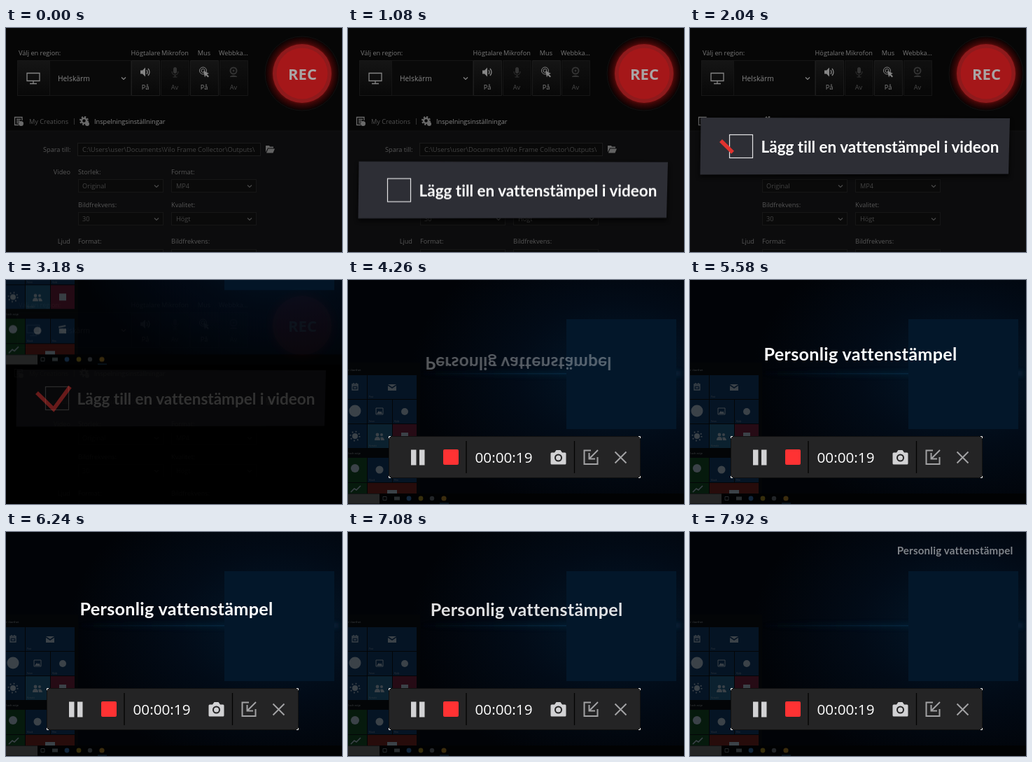
Recreate the animation shown at these times as an HTML page. Size 480 by 320 pixels, loop 8000 ms.

```html
<!DOCTYPE html>
<html lang="sv">
<head>
<meta charset="utf-8">
<title>Personlig vattenstämpel</title>
<style>
html, body { margin: 0; width: 100%; height: 100%; overflow: hidden; background: #000; }
svg { display: block; width: 100vw; height: 100vh; }
text { font-family: "Open Sans", "Noto Sans", sans-serif; font-size: 9.2px; }
.lato { font-family: Lato, "Open Sans", sans-serif; font-weight: 700; font-variant-ligatures: none; fill: #fff; text-anchor: middle; }
.mid { text-anchor: middle; }
.end { text-anchor: end; }
.line { fill: none; stroke: currentColor; }
.anim { animation: 8s linear infinite; }

#recorder { animation-name: fade; animation-timing-function: cubic-bezier(.2, .8, .4, 1); }
#plate { animation-name: fade; animation-timing-function: cubic-bezier(.25, .53, .6, 1); }
#banner { animation-name: rise; }
#check { animation-name: tick, fade; stroke-dasharray: 1 1.2; }
#desktop { animation-name: drop; }
#toolbar { animation-name: lift; }
#mark { animation-name: mark; }

@keyframes fade {
  0%, 36% { opacity: 1; }
  42.75%, 100% { opacity: 0; }
}
@keyframes rise {
  0%, 9.75% { transform: translateY(200px); animation-timing-function: cubic-bezier(.33, .31, .67, 1); }
  16.5%, 100% { transform: none; }
}
@keyframes tick {
  0%, 24.75% { stroke-dashoffset: 1.02; }
  27%, 100% { stroke-dashoffset: 0; }
}
@keyframes drop {
  0%, 36% { transform: translateY(-320px); animation-timing-function: ease-in; }
  42.75%, 100% { transform: none; }
}
@keyframes lift {
  0%, 36% { transform: translateY(320px); animation-timing-function: ease-in; }
  42.75%, 100% { transform: none; }
}
@keyframes mark {
  0%, 52.5% { opacity: 0; transform: translate(243.5px, 119px) scale(.964, -1); }
  53.25% { opacity: .34; transform: translate(243.5px, 119px) scale(.964, -1); animation-timing-function: ease-in-out; }
  63.75% { opacity: 1; transform: translate(243.5px, 125px) scale(1, 1); animation-timing-function: ease-in-out; }
  69.75% { transform: translate(243.5px, 106px) scale(1, 1); }
  73.5% { transform: translate(243.5px, 103px) scale(1, 1); animation-timing-function: ease-in-out; }
  83.25%, 87.75% { opacity: 1; transform: translate(243.5px, 119px) scale(1, 1); }
  88.5% { opacity: .88; transform: translate(255px, 111px) scale(.995, .995); }
  98.75%, 100% { opacity: .5; transform: translate(378.5px, 27px) scale(.6, .6); }
}
</style>
</head>
<body>
<svg viewBox="0 0 480 320" preserveAspectRatio="none">
  <defs>
    <radialGradient id="sky" gradientUnits="userSpaceOnUse" cx="390" cy="135" r="300" gradientTransform="translate(0 40) scale(1 .7)">
      <stop offset="0" stop-color="#03182b"/>
      <stop offset=".5" stop-color="#020b17"/>
      <stop offset="1" stop-color="#010307"/>
    </radialGradient>
    <linearGradient id="beam">
      <stop offset="0" stop-color="#0b3350" stop-opacity="0"/>
      <stop offset="1" stop-color="#0b3350"/>
    </linearGradient>
    <radialGradient id="glow">
      <stop offset=".7" stop-color="#8a1212"/>
      <stop offset=".84" stop-color="#3a0606"/>
      <stop offset="1" stop-color="#080202"/>
    </radialGradient>
    <linearGradient id="tile" x2="0" y2="1">
      <stop offset="0" stop-color="#151515"/>
      <stop offset="1" stop-color="#080808"/>
    </linearGradient>
    <filter id="soft" x="-10%" y="-200%" width="120%" height="500%"><feGaussianBlur stdDeviation="3"/></filter>
    <path id="chevron" class="line" d="M-3-1.5 0 1.5 3-1.5" stroke-width="1.2"/>
    <g id="combo">
      <rect x=".5" y=".5" width="121" height="18" fill="#0a0a0a" stroke="#161616"/>
      <use href="#chevron" x="112" y="10"/>
    </g>
  </defs>

  <rect width="480" height="320"/>

  <g id="desktop" class="anim">
    <rect width="480" height="320" fill="url(#sky)"/>
    <rect x="100" y="130" width="375" height="7" fill="url(#beam)" opacity=".55" filter="url(#soft)"/>
    <rect x="100" y="133" width="212" height="1.5" fill="url(#beam)" opacity=".5"/>
    <rect x="312" y="56" width="157" height="157" fill="#03172a"/>

    <rect y="118" width="103" height="188" fill="#030507"/>
    <g opacity=".55">
      <g fill="#6c7073">
        <text x="0" y="130" style="font-size:4px">r i korthet</text>
        <text x="0" y="249" style="font-size:4px">l och nöje</text>
      </g>
      <g fill="#08213d">
        <path d="M0 136h27v34H0zM28 136h70v34H28zM0 171h27v34H0zM28 171h35v34H28zM64 171h34v34H64zM0 206h27v34H0z"/>
        <path d="M28 254h35v35H28zM64 254h34v35H64z"/>
      </g>
      <path d="M28 206h35v34H28z" fill="#123950"/>
      <path d="M64 206h34v34H64z" fill="#431021"/>
      <path d="M0 254h27v35H0zM0 290h27v15H0z" fill="#0a2c12"/>
      <path d="M28 290h70v15H28z" fill="#46120f"/>

      <g color="#69747e" fill="#69747e">
        <path class="line" d="M6 149h8v8H6zM6 151h8M8 147v2M12 147v2M8 154h4" stroke-width="1.3"/>
        <path d="M57 149h12l-6 4zM57 151l6 4 6-4v7H57z"/>
        <circle cx="10" cy="187" r="8.5"/>
        <path class="line" d="M40 183h10v9H40z"/>
        <path d="M41 191l3-4 2 2 1-2 2 4z"/>
        <circle cx="81" cy="188" r="5"/>
        <circle cx="10" cy="223" r="4"/>
        <circle class="line" cx="10" cy="223" r="6.5" stroke-width="2" stroke-dasharray="1.6 3.5"/>
        <circle cx="42" cy="221" r="2.4"/><circle cx="48" cy="221" r="2"/>
        <path d="M38 229q0-5 4-5t4 5zM47 229q0-3-1-4 5-2 6 4z"/>
        <rect x="76" y="218" width="10" height="10"/>
        <circle cx="10" cy="269" r="6"/>
        <circle cx="45" cy="271" r="5.5"/>
        <path d="M76 268h10v7H76zM75 265l10-2 .5 2-10 2z"/>
        <path class="line" d="M4 303l5-5 3 2 6-6" stroke-width="1.6"/>
        <path d="M56 300h14v5H56z"/>
      </g>
      <g fill="#59636d">
        <text x="30" y="168" style="font-size:3px">Post</text>
        <text x="30" y="203" style="font-size:3px">Foton</text>
        <text x="66" y="203" style="font-size:3px">Hjälp</text>
        <text x="30" y="238" style="font-size:3px">Kontakt</text>
        <text x="30" y="287" style="font-size:3px">Musik</text>
        <text x="66" y="287" style="font-size:3px">Film</text>
      </g>
    </g>

    <rect y="305" width="480" height="15" fill="#010203"/>
    <rect y="305.5" width="45" height="14" fill="#252626"/>
    <g opacity=".5">
      <path class="line" d="M50 309.5h5v5h-5z" color="#4a5054"/>
      <rect x="66" y="309.5" width="8" height="5" fill="#4d5659"/>
      <circle cx="87" cy="312" r="3.4" fill="#234a73"/>
      <circle cx="104" cy="312" r="3.4" fill="#6b5a16"/>
      <circle cx="120" cy="312" r="3.2" fill="#44494d"/>
      <circle cx="137" cy="312" r="3.6" fill="#75561a"/>
      <path d="M131 318.5h13v1h-13z" fill="#234f70"/>
    </g>
  </g>

  <g id="toolbar" class="anim">
    <rect x="58.5" y="223.5" width="359" height="59" fill="#242425" stroke="#111"/>
    <path class="line" d="M58.5 226v-2.5h2.500M415 223.5h2.500v2.500M417.5 280v2.500H415M61 282.5h-2.500V280" color="#eee"/>
    <path d="M90 242.500h7.500v22H90zM102 242.500h7.500v22H102z" fill="#d2d2d4"/>
    <rect x="136" y="242" width="22" height="22" rx="2" fill="#ff3233"/>
    <path class="line" d="M169 230v46M323.500 230v46" color="#030303" stroke-width="1.3"/>
    <text class="mid" x="222.500" y="260.700" fill="#fff" style="font-size:20.7px">00:00:19</text>
    <path d="M291 246.500h4l2.500-3.500h6l2.500 3.500h4q1.500 0 1.500 1.500v14q0 1.500-1.500 1.500h-19q-1.500 0-1.500-1.500v-14q0-1.500 1.500-1.500z" fill="#d2d2d4"/>
    <circle cx="300.500" cy="254" r="4.500" fill="#d2d2d4" stroke="#242425" stroke-width="2"/>
    <path class="line" d="M347 243.500h-9.500v19.500h19V253M357 243l-12 12M344.500 247v8.500h8.500" color="#a2a2a4" stroke-width="2"/>
    <path class="line" d="M381.500 245.500l16 16M397.500 245.500l-16 16" color="#a2a2a4" stroke-width="2"/>
  </g>

  <g id="mark" class="anim">
    <text class="lato" y="9" style="font-size:25.2px;letter-spacing:.3px">Personlig vattenstämpel</text>
  </g>

  <g id="recorder" class="anim">
    <rect width="480" height="320" fill="#060606"/>
    <rect y="147" width="480" height="173" fill="#0c0c0d"/>
    <path d="M0 147h480" stroke="#131313"/>

    <g fill="#787878">
      <text x="18" y="39">Välj en region:</text>
      <g class="mid">
        <text x="199.500" y="39">Högtalare</text>
        <text x="241.500" y="39">Mikrofon</text>
        <text x="283" y="39">Mus</text>
        <text x="325" y="39">Webbka...</text>
      </g>
    </g>

    <rect x="16.500" y="46.500" width="46" height="50" fill="url(#tile)" stroke="#171717"/>
    <rect x="62.500" y="46.500" width="116" height="50" fill="#090909" stroke="#151515"/>
    <g fill="url(#tile)" stroke="#1c1c1c">
      <path d="M179.500 46.500h40v50h-40zM263.500 46.500h40v50h-40z"/>
      <path d="M221.500 46.500h40v50h-40zM305.500 46.500h40v50h-40z" opacity=".7"/>
    </g>
    <g color="#858585" fill="#858585">
      <path class="line" d="M30 64.500h18v11H30zM39 76v3M34 79.500h10" stroke-width="1.3"/>
      <text x="74" y="75.500" style="font-size:10.3px">Helskärm</text>
      <use href="#chevron" x="168" y="72"/>
      <path d="M192 60.500h3l4-4v13l-4-4h-3z"/>
      <path class="line" d="M201 60q2 3 0 6M203 58q4 5 0 10" stroke-width="1.3"/>
      <circle class="line" cx="281.500" cy="61" r="5"/>
      <circle class="line" cx="281.500" cy="61" r="2.500"/>
      <path d="M282 61l8 4-3 1 3 3-1.500 1.500-3-3-1.500 3z"/>
      <text class="mid" x="199" y="88">På</text>
      <text class="mid" x="283" y="88">På</text>
    </g>
    <g color="#333" fill="#333">
      <rect x="239" y="56" width="5" height="9" rx="2.500"/>
      <path class="line" d="M237 62q0 5 4.500 5t4.500-5M241.500 67v3M238.500 70h6"/>
      <circle class="line" cx="325" cy="61" r="4.500" stroke-width="2"/>
      <circle cx="325" cy="61" r="1.500"/>
      <path d="M320 69q5-3 10 0v1h-10z"/>
      <text class="mid" x="241" y="88" fill="#484848">Av</text>
      <text class="mid" x="325" y="88" fill="#484848">Av</text>
    </g>

    <circle cx="423" cy="65" r="53" fill="url(#glow)" stroke="#111"/>
    <circle cx="423" cy="65" r="42" fill="#8e1a1c"/>
    <circle cx="423" cy="65" r="36.500" fill="#a51719"/>
    <text class="mid" x="423.500" y="74" fill="#aaa4a4" style="font-size:22px;font-weight:700">REC</text>

    <g color="#6a6a6a" fill="#6a6a6a">
      <path class="line" d="M23 132v-4.500H12.500v11H18M15 130.500h6M15 133h5M15 135.500h3" stroke-width="1.3"/>
      <circle cx="21.500" cy="136.500" r="3.500"/>
      <text x="33" y="136.500" fill="#505050">My Creations</text>
      <path d="M97 129v9h1v-9z" fill="#333"/>
      <circle class="line" cx="111.500" cy="132.500" r="3.500" stroke-width="2.500"/>
      <circle class="line" cx="111.500" cy="132.500" r="5.500" stroke-width="2" stroke-dasharray="2.300 2"/>
      <circle cx="116" cy="137" r="3"/>
      <text x="126" y="136.500" fill="#858585">Inspelningsinställningar</text>
    </g>

    <rect x="102.500" y="164.500" width="261" height="18" fill="#090909" stroke="#1a1a1a"/>
    <path d="M371 168h5l1 1.500h5v2h-8l-3 6zM374.500 172.500H384l-2.500 6H372z" fill="#626262"/>
    <g color="#4a4a4a">
      <use href="#combo" x="103" y="216"/>
      <use href="#combo" x="236" y="216"/>
      <use href="#combo" x="103" y="263"/>
      <use href="#combo" x="236" y="263"/>
      <use href="#combo" x="103" y="316"/>
      <use href="#combo" x="236" y="316"/>
    </g>
    <g fill="#565656">
      <g class="end">
        <text x="92.500" y="176.500">Spara till:</text>
        <text x="92" y="209">Video</text>
        <text x="92" y="308">Ljud</text>
      </g>
      <text x="103" y="209">Storlek:</text>
      <text x="236" y="209">Format:</text>
      <text x="103" y="256">Bildfrekvens:</text>
      <text x="236" y="256">Kvalitet:</text>
      <text x="103" y="308">Format:</text>
      <text x="236" y="308">Bildfrekvens:</text>
    </g>
    <g fill="#434343">
      <text x="109" y="176.500" style="font-size:9.4px">C:\Users\user\Documents\Vilo Frame Collector\Outputs\</text>
      <text x="109" y="229">Original</text>
      <text x="243" y="229">MP4</text>
      <text x="109" y="276">30</text>
      <text x="243" y="276">Högt</text>
    </g>
  </g>

  <g id="banner" class="anim">
    <g id="plate" class="anim">
      <path d="M15 131L457 132 456 213H14z" opacity=".7" filter="url(#soft)"/>
      <path d="M15.500 128L457 129 455 208.500 14.500 209.500z" fill="#2d2e35"/>
      <rect x="56.500" y="152.500" width="33" height="33" fill="none" stroke="#e4e4e6" stroke-width="1.200"/>
      <text class="lato" x="271.500" y="178" style="font-size:22.5px">Lägg till en vattenstämpel i videon</text>
    </g>
    <path id="check" class="anim line" pathLength="1" d="M44 161L68 184.500 91.500 152.500" color="#e0332f" stroke-width="5.500"/>
  </g>
</svg>
</body>
</html>
```
